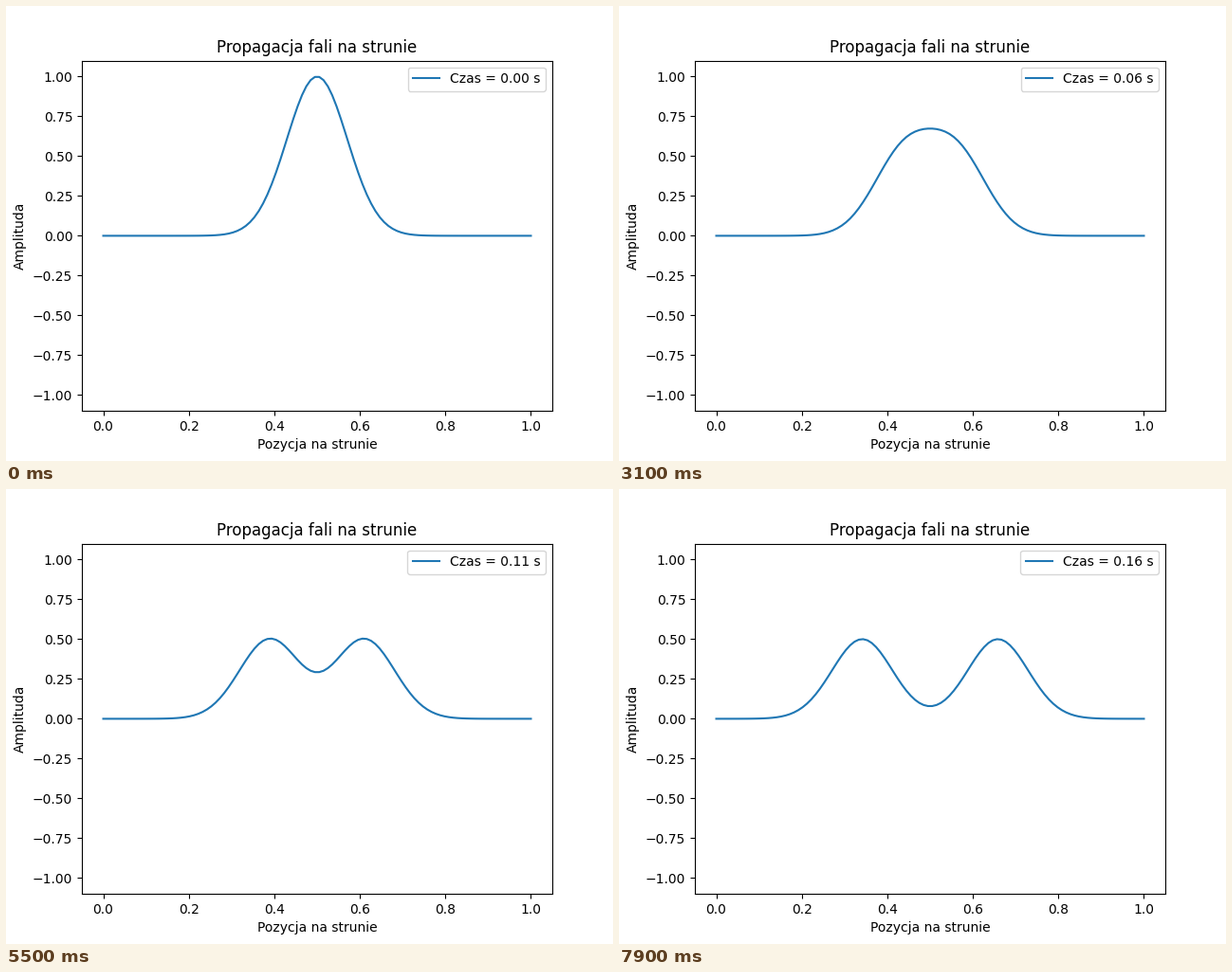
A matplotlib script for the animation above (8000 ms loop, 640 px wide and 480 px high).

```python
import numpy as np
import matplotlib.pyplot as plt
from matplotlib.animation import FuncAnimation

FRAMES = 80
INTERVAL = 100  # ms
SPEED = 1.0
DT = 0.002

x = np.linspace(0, 1, 100)


def simulate(steps):
    """Leapfrog solution of the wave equation with fixed ends, released from rest."""
    r2 = (SPEED * DT / (x[1] - x[0])) ** 2
    u = np.zeros((steps, x.size))
    u[0] = u[1] = np.exp(-100 * (x - 0.5) ** 2)
    for n in range(1, steps - 1):
        bend = u[n, 2:] - 2 * u[n, 1:-1] + u[n, :-2]
        u[n + 1, 1:-1] = 2 * u[n, 1:-1] - u[n - 1, 1:-1] + r2 * bend
    return u


wave = simulate(FRAMES + 1)

fig, ax = plt.subplots(figsize=(6.4, 4.8), dpi=100)
line, = ax.plot(x, wave[0])
ax.set_xlim(-0.05, 1.05)
ax.set_ylim(-1.1, 1.1)
ax.set_title("Propagacja fali na strunie")
ax.set_xlabel("Pozycja na strunie")
ax.set_ylabel("Amplituda")


def update(frame):
    step = frame + 1
    line.set_ydata(wave[step])
    line.set_label(f"Czas = {step * DT:.2f} s")
    ax.legend(loc="upper right")
    return line,


anim = FuncAnimation(fig, update, frames=FRAMES, interval=INTERVAL,
                     repeat=True, repeat_delay=0, blit=False)
plt.show()
```
